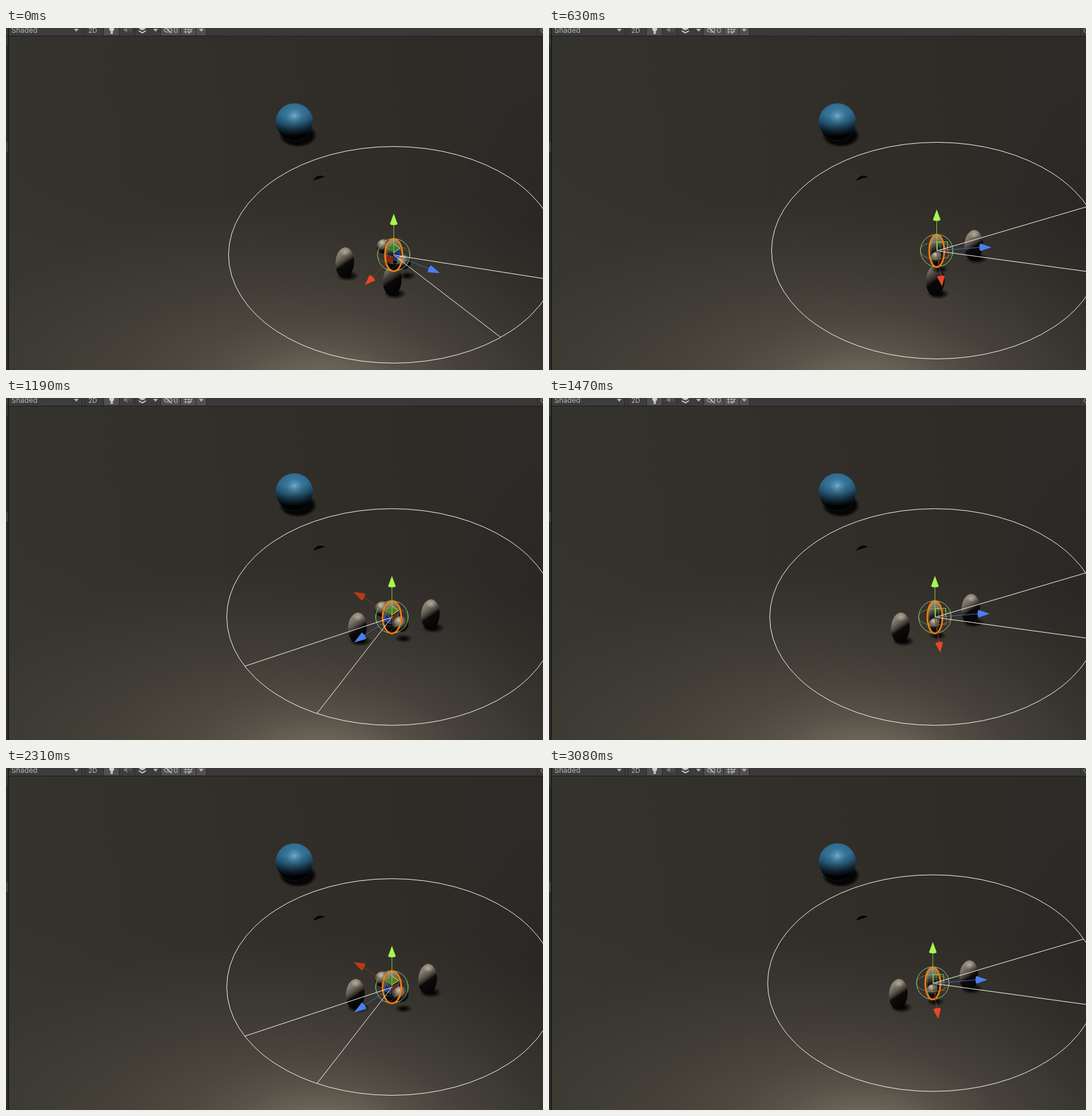
Animation of 894 by 570 pixels, one loop 3.15 s. Source, as an HTML page with a canvas:

```html
<!DOCTYPE html>
<html lang="en">
<head>
<meta charset="utf-8">
<title>Scene view</title>
<style>
  html, body { margin: 0; width: 100%; height: 100%; overflow: hidden; background: #322f2b; }
  canvas { display: block; }
</style>
</head>
<body>
<canvas id="view" width="894" height="570"></canvas>
<script>
const W = 894, H = 570, LOOP = 3150, TAU = Math.PI * 2;
const view = document.getElementById('view').getContext('2d');
const backdrop = document.createElement('canvas');
backdrop.width = W;
backdrop.height = H;
let c = backdrop.getContext('2d');

// Offsets are relative to the walker's centre.
const POSES = {
  southEast: {
    blue: [60, 23, 77, 30], red: [-36, 38, -48, 50], redTone: '#e84822',
    cone: [[268, 42], [178, 137]], ring: 14.5,
    back: [-16, -14, 12], front: [17, 12, 12], shade: [23, 35],
    quads: [['#3c7a22', 0, -19, 11, -12, 0, -4, -11, -12],
            ['#8c2012', -13, 0, -1, 3, -1, 15, -13, 10],
            ['#1c2f80', 1, -5, 11, -10, 11, 7, 1, 10]]
  },
  east: {
    blue: [73, -6, 91, -6], red: [7, 43, 9, 59], redTone: '#e84822',
    cone: [[251, -74], [269, 37]], ring: 12.5,
    back: null, front: [1, 13, 11], shade: [5, 31], quads: []
  },
  southWest: {
    blue: [-47, 31, -63, 42], red: [-48, -34, -64, -42], redTone: '#b83a1a',
    cone: [[-245, 81.5], [-125, 160.5]], ring: 15.5,
    back: [-15, -13, 13], front: [15, 12, 13], shade: [20, 36],
    quads: [['#5a7a2c', 0, -19, 12, -11, 0, -3, -12, -11],
            ['#1c2f80', -12, -5, -1, 0, -1, 12, -12, 6],
            ['#74241a', 1, 0, 11, -6, 11, 7, 1, 13]]
  }
};

const STEPS = [
  { at: 0, pose: 'southEast', body: [645, 378], feet: [[564, 391], [643, 421]] },
  { at: 70, pose: 'east', body: [645, 371], feet: [[707, 362], [643, 421]] },
  { at: 770, pose: 'southWest', body: [642, 365], feet: [[585, 383], [706.5, 361]] },
  { at: 1470, pose: 'east', body: [642, 365], feet: [[585, 383], [702, 352]] },
  { at: 2170, pose: 'southWest', body: [642, 365], feet: [[581.5, 377], [702, 352]] },
  { at: 2870, pose: 'east', body: [638.5, 358.5], feet: [[581.5, 377], [699, 346]] }
];

function ellipse(x, y, rx, ry, fill, stroke, width = 1, tilt = 0) {
  c.beginPath();
  c.ellipse(x, y, rx, ry, tilt, 0, TAU);
  if (fill) { c.fillStyle = fill; c.fill(); }
  if (stroke) { c.strokeStyle = stroke; c.lineWidth = width; c.stroke(); }
}

function poly(points, fill, stroke) {
  c.beginPath();
  for (let i = 0; i < points.length; i += 2) c.lineTo(points[i], points[i + 1]);
  c.closePath();
  if (fill) { c.fillStyle = fill; c.fill(); }
  if (stroke) { c.strokeStyle = stroke; c.lineWidth = 1; c.stroke(); }
}

function line(x1, y1, x2, y2, color, width = 1) {
  c.beginPath();
  c.moveTo(x1, y1);
  c.lineTo(x2, y2);
  c.strokeStyle = color;
  c.lineWidth = width;
  c.stroke();
}

function rect(x, y, w, h, color) {
  c.fillStyle = color;
  c.fillRect(x, y, w, h);
}

function ramp(gradient, stops) {
  for (const [at, color] of stops) gradient.addColorStop(at, color);
  return gradient;
}

function glow(x, y, rx, ry, stops) {
  c.save();
  c.translate(x, y);
  c.scale(rx, ry);
  ellipse(0, 0, 1, 1, ramp(c.createRadialGradient(0, 0, 0, 0, 0, 1), stops));
  c.restore();
}

function shadow(x, y, rx, ry, core = 0.35) {
  glow(x, y, rx, ry, [[0, 'rgba(0,0,0,.95)'], [core, 'rgba(0,0,0,.88)'], [1, 'rgba(0,0,0,0)']]);
}

function ground() {
  rect(0, 0, W, H, ramp(c.createLinearGradient(0, 200, W, 100),
    [[0, '#35332e'], [0.45, '#322f2a'], [0.75, '#2f2c28'], [1, '#2d2a27']]));
  const warm = a => `rgba(126,118,104,${a})`;
  glow(525, 612, 620, 340, [[0, warm(0.92)], [0.12, warm(0.76)], [0.25, warm(0.48)],
    [0.4, warm(0.29)], [0.6, warm(0.15)], [0.8, warm(0.06)], [1, warm(0)]]);
  const olive = a => `rgba(120,110,88,${a})`;
  glow(120, 560, 620, 300, [[0, olive(0.09)], [0.5, olive(0.05)], [1, olive(0)]]);
  glow(900, 330, 180, 260, [[0, 'rgba(0,0,0,.07)'], [1, 'rgba(0,0,0,0)']]);
}

function ball() {
  shadow(486, 179, 32, 20, 0.76);
  c.save();
  c.beginPath();
  c.arc(480, 156.5, 31, 0, TAU);
  c.clip();
  rect(449, 125, 62, 63, ramp(c.createRadialGradient(480, 146, 0, 480, 150, 33),
    [[0, '#74adcc'], [0.15, '#5590b3'], [0.4, '#387699'], [0.75, '#2e698e'], [1, '#28638a']]));
  rect(449, 125, 62, 63, ramp(c.createRadialGradient(477, 100, 48, 477, 100, 81),
    [[0, 'rgba(0,0,0,0)'], [0.35, 'rgba(0,0,0,.22)'], [0.7, 'rgba(0,0,0,.65)'], [1, '#000']]));
  c.restore();
  c.beginPath();
  c.moveTo(511, 254.5);
  c.quadraticCurveTo(519, 242, 531, 248);
  c.quadraticCurveTo(521, 251, 511, 254.5);
  c.fillStyle = '#050505';
  c.fill();
}

function caret(x) {
  poly([x - 4, 1.5, x + 4, 1.5, x, 6], '#bdbdbd');
}

function label(text, x, color = '#b9b9b9', size = 12) {
  c.font = `${size}px Inter, "Liberation Sans", sans-serif`;
  c.fillStyle = color;
  c.fillText(text, x, 8);
}

function toolbar() {
  rect(0, 0, W, 13, '#393939');
  rect(0, 0, 333, 12, '#3d3d3d');
  rect(0, 13, W, 1, '#1d1d1c');
  rect(0, 14, 4, H - 14, '#2c2c2b');
  rect(0, 14, 3, 15, '#393939');
  rect(0, 190, 3, 16, '#444444');
  rect(3.5, 0, 1.5, H, '#171716');
  rect(163, 0, 25, 12, '#505050');
  rect(258, 0, 75, 12, '#505050');
  for (const x of [126, 131, 162, 188, 214, 257, 290, 316, 333]) rect(x, 0, 1, 13, '#292929');
  rect(884, 0, 1, 13, '#292929');
  label('Shaded', 9);
  caret(117);
  label('2D', 137, '#bcbcbc', 11);
  ellipse(176, 1.5, 4, 4, '#d2d2d2');
  rect(174, 5, 4, 5, '#bcbcbc');
  poly([196, 1, 199, 1, 202, -2, 202, 8, 199, 5, 196, 5], '#777');
  for (const r of [3, 6]) {
    c.beginPath();
    c.arc(202, 2, r, -0.9, 0.9);
    c.strokeStyle = '#777';
    c.stroke();
  }
  poly([221, 1, 227, -2, 233, 1, 227, 4], '#c8c8c8');
  c.beginPath();
  c.moveTo(221, 4.5);
  c.lineTo(227, 8);
  c.lineTo(233, 4.5);
  c.strokeStyle = '#c8c8c8';
  c.lineWidth = 2;
  c.stroke();
  caret(249);
  ellipse(270, 3.5, 6.5, 3.5, null, '#b5b5b5', 1.2);
  ellipse(270, 3.5, 1.8, 1.8, '#b5b5b5');
  line(264, -2, 276, 9, '#c4c4c4', 1.3);
  label('0', 279);
  for (const x of [299, 304]) line(x, 0, x, 10, '#bcbcbc');
  for (const y of [2.5, 6.5]) line(296, y, 310, y, '#bcbcbc');
  line(305, 9, 310, 1, '#c4c4c4', 1.4);
  caret(325);
  line(890, 4, 894, 0, '#aaa');
  line(890, 4, 894, 8, '#aaa');
}

function foot([x, y]) {
  shadow(x + 5, y + 22, 19, 9);
  const inShade = y > 410;
  const skin = ramp(c.createLinearGradient(x - 13, y - 19, x + 13, y + 19), inShade
    ? [[0, '#8a8478'], [0.25, '#4c4841'], [0.42, '#2a2825'], [0.53, '#090807'], [1, '#040404']]
    : [[0, '#8f887b'], [0.2, '#7d766a'], [0.36, '#5c564d'], [0.47, '#37332e'], [0.56, '#0c0b0a'], [1, '#030303']]);
  ellipse(x, y, 15.5, 25.5, skin, null, 1, 0.06);
  if (!inShade) glow(x + 1, y - 18, 9, 7, [[0, 'rgba(214,204,186,.6)'], [1, 'rgba(214,204,186,0)']]);
}

function knob([dx, dy, r], x, y) {
  const px = x + dx, py = y + dy;
  ellipse(px, py, r, r, ramp(c.createRadialGradient(px - 3, py - 7, 0, px - 3, py - 6, r * 1.6),
    [[0, '#cfc4b3'], [0.26, '#8c8478'], [0.5, '#4a463f'], [0.68, '#12100f'], [1, '#050505']]));
}

function arrow(x, y, [bx, by, tx, ty], color, stem) {
  const len = Math.hypot(tx - bx, ty - by);
  const nx = -(ty - by) / len * 6.3, ny = (tx - bx) / len * 6.3;
  line(x, y, x + bx, y + by, stem);
  poly([x + tx, y + ty, x + bx + nx, y + by + ny, x + bx - nx, y + by - ny], color);
  ellipse(x + bx, y + by, 6.2, 2, color, null, 1, Math.atan2(ny, nx));
}

function walker(pose, [x, y]) {
  shadow(x + pose.shade[0], y + pose.shade[1], 15, 7, 0.2);
  if (pose.back) knob(pose.back, x, y);
  ellipse(x, y, pose.ring - 1, 26, ramp(c.createLinearGradient(x - 6, y - 26, x + 8, y + 18),
    [[0, '#a39c8e'], [0.3, '#6a645a'], [0.52, '#24211e'], [0.7, '#0a0908'], [1, '#060505']]));
  for (const [color, ...pts] of pose.quads) {
    poly(pts.map((v, i) => v + (i % 2 ? y : x)), color, '#8fc06a55');
  }
  knob(pose.front, x, y);

  const wire = '#8bd672';
  ellipse(x + 0.5, y, 27, 27, null, wire);
  if (pose.quads.length) {
    ellipse(x, y, 27, 15, null, '#8bd67255');
    ellipse(x, y, 11, 25, null, '#8bd67255', 1, 0.25);
    line(x, y - 19, x + 11, y - 11, '#b8e86a');
    line(x, y - 3, x + 11, y - 11, '#b8e86a');
  } else {
    ellipse(x, y, 27, 14, null, '#8bd67288');
    ellipse(x - 1, y, 8, 27, null, '#8bd67266');
    c.strokeStyle = '#7fe04a';
    c.strokeRect(x + 1.5, y - 14.5, 17, 14);
    c.strokeStyle = '#c2431f';
    c.strokeRect(x + 12.5, y - 2.5, 7, 15);
  }
  ellipse(x + 0.5, y + 0.3, pose.ring, 27, null, '#f47b16', 2.8);
}

function gizmos(pose, [left, top]) {
  const x = left + 0.5, y = top + 0.5;
  ellipse(x, top, 275, 180.5, null, '#f8f8f4');
  for (const [dx, dy] of pose.cone) line(x, y, x + dx, y + dy, '#f8f8f4');
  arrow(x, y, pose.red, pose.redTone, '#8c3a28');
  arrow(x, y, pose.blue, '#4a80ee', '#4668c4');
  arrow(x, y, [0, -52, 0, -69], '#a6f650', '#84c944');
}

function draw(now) {
  const t = now % LOOP;
  const step = STEPS.findLast(s => s.at <= t);
  const pose = POSES[step.pose];
  c.drawImage(backdrop, 0, 0);
  step.feet.forEach(foot);
  walker(pose, step.body);
  gizmos(pose, step.body);
}

ground();
ball();
toolbar();
c = view;

const start = performance.now();
function tick() {
  draw(performance.now() - start);
  requestAnimationFrame(tick);
}
tick();
</script>
</body>
</html>
```
